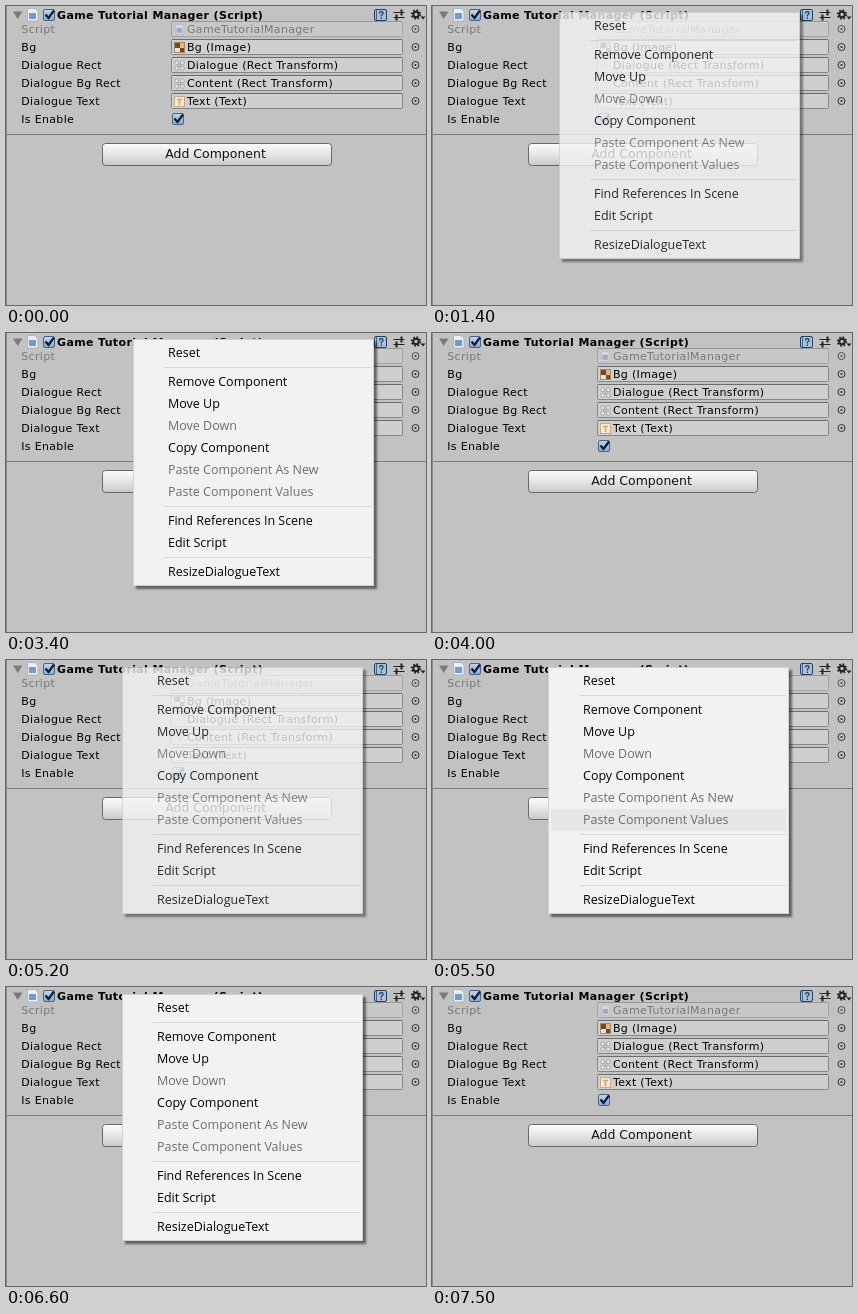
These frames come from a looping animation (420x299 px, 7.7 s). An HTML page:

```html
<!DOCTYPE html>
<html lang="en">
<head>
<meta charset="utf-8">
<title>Component context menu</title>
<style>
  html, body { margin: 0; width: 100%; height: 100%; overflow: hidden; background: #c2c2c2; }
  #stage { position: relative; width: 420px; height: 299px; overflow: hidden; }
  svg { display: block; }
  text { font: 11px "DejaVu Sans", sans-serif; letter-spacing: .32px; fill: #000; }
  .title { font-weight: bold; letter-spacing: .36px; }
  .button { font-size: 12.5px; letter-spacing: 0; text-anchor: middle; fill: #111; }
  .dim { fill: #787878; }

  .menu {
    position: absolute; left: 127px; top: 6px; width: 241px; height: 247px;
    box-sizing: border-box; padding: 2px;
    background: #f2f2f2; border: 1px solid #d0d0d0;
    box-shadow: 3px 3px 2px rgba(0, 0, 0, .5);
    font: 12.5px/22px "Open Sans", "Noto Sans", sans-serif; color: #000;
    white-space: nowrap; opacity: 0;
    animation: menu 7.7s step-end infinite;
  }
  .menu p { position: relative; margin: 0; height: 22px; padding-left: 32px; }
  .menu .off { color: #6d6d6d; }
  .menu hr { position: relative; margin: 3px 0 3px 28px; border: 0; height: 1px; background: #d7d7d7; }
  .hover {
    position: absolute; left: 2px; top: 0; width: 235px; height: 22px;
    background: #91c9f7; opacity: 0;
    animation: hover 7.7s step-end infinite;
  }

  @keyframes menu {
    0%     { opacity: 0; transform: none; }
    18.18% { opacity: .8; }
    19.48% { opacity: 1; }
    51.94% { opacity: 0; transform: translate(-11px, 1px); }
    67.53% { opacity: .8; }
    68.83% { opacity: 1; }
    97.4%, 100% { opacity: 0; transform: translate(-11px, 1px); }
  }
  @keyframes hover {
    0%     { opacity: 0; top: 97px; background: #91c9f7; }
    23.37% { opacity: 1; top: 97px; }
    24.67% { top: 170px; }
    25.97% { opacity: 1; top: 221px; }
    44.15% { opacity: 0; }
    70.12% { opacity: 1; top: 97px; background: #91c9f7; }
    71.42% { top: 141px; background: #e6e6e6; }
    72.72% { top: 170px; background: #91c9f7; }
    74.02% { top: 192px; }
    75.32% { opacity: 0; }
    76.62% { opacity: 1; top: 221px; }
    85.71%, 100% { opacity: 0; top: 221px; background: #91c9f7; }
  }
</style>
</head>
<body>
<div id="stage">
  <svg width="420" height="299" viewBox="0 0 420 299">
    <defs>
      <linearGradient id="face" x2="0" y2="1">
        <stop offset="0" stop-color="#fcfcfc"/>
        <stop offset=".5" stop-color="#e5e5e5"/>
        <stop offset="1" stop-color="#c8c8c8"/>
      </linearGradient>
      <linearGradient id="box" x2="0" y2="1">
        <stop offset="0" stop-color="#c3d5ea"/>
        <stop offset="1" stop-color="#86a8d2"/>
      </linearGradient>
      <g id="field">
        <rect x="165.5" y=".5" width="231" height="15" rx="1" fill="#cfcfcf" stroke="#868686"/>
        <path d="M166 .5h230" stroke="#6c6c6c"/>
      </g>
      <g id="pick">
        <circle cx="409.5" cy="8" r="3.5" fill="none" stroke="#303030"/>
        <circle cx="409.5" cy="8" r="1" fill="#202020"/>
      </g>
      <g id="row"><use href="#field"/><use href="#pick"/></g>
      <g id="check">
        <rect x=".5" y=".5" width="11" height="11" rx="1.5" fill="url(#box)" stroke="#4c6488"/>
        <path d="M2.5 5.5l3 3.5L11 1.5" fill="none" stroke="#0c1d33" stroke-width="2.2"/>
      </g>
      <g id="anchors" fill="#e4e4e4" stroke="#a0a0a0" stroke-width=".9">
        <circle cx="2.7" cy="2.7" r="2"/><circle cx="8.3" cy="2.7" r="2"/>
        <circle cx="2.7" cy="8.3" r="2"/><circle cx="8.3" cy="8.3" r="2"/>
        <path d="M4 4l3 3M7 4L4 7"/>
      </g>
      <g id="page">
        <path d="M.5.5h7.500l3 3v9.500h-10.500z" fill="#eaeff5" stroke="#a9b6c6"/>
        <rect x="2" y="5" width="7" height="6" fill="#6f9bd0"/>
      </g>
    </defs>

    <rect width="420" height="299" fill="#c2c2c2"/>
    <path d="M.5 0v299" stroke="#8a8a8a"/>
    <path d="M1 128.5h419" stroke="#7c7c7c"/>

    <path d="M7 5.5h9.5L11.7 13z" fill="#7a7a7a"/>
    <use href="#page" x="21" y="2"/>
    <use href="#check" x="37" y="3"/>
    <text class="title" x="51" y="13">Game Tutorial Manager (Script)</text>

    <!-- header tools -->
    <rect x="368.500" y="3.500" width="12" height="11" rx="1.5" fill="#a9bfda" stroke="#23405f"/>
    <path d="M370.500 4v10" stroke="#3f648f"/>
    <path d="M373.500 7.400q0-1.700 1.800-1.700t1.800 1.600q0 1-1.800 2v1.200M375.300 11.500v1.500" fill="none" stroke="#1d3652" stroke-width="1.2"/>
    <g fill="none" stroke="#222">
      <path d="M387.500 6.500h11M387.500 11.500h11"/>
      <path d="M395.500 3.500v6M390.500 8.500v6" stroke-width="2"/>
      <circle cx="410" cy="8.500" r="2.700" stroke-width="2"/>
      <circle cx="410" cy="8.500" r="4.300" stroke-width="1.800" stroke-dasharray="1.650 1.727"/>
    </g>
    <path d="M414.500 10.500h5l-2.500 3z" fill="#222"/>

    <!-- properties -->
    <g opacity=".5">
      <use href="#field" y="15"/>
      <use href="#page" transform="translate(169 18) scale(.8)"/>
    </g>
    <use href="#pick" y="15" opacity=".8"/>
    <use href="#row" y="33"/>
    <use href="#row" y="51"/>
    <use href="#row" y="69"/>
    <use href="#row" y="87"/>

    <text class="dim" x="15.300" y="27">Script</text>
    <text class="dim" x="181" y="27">GameTutorialManager</text>
    <text x="15.300" y="45">Bg</text>
    <text x="181" y="45">Bg (Image)</text>
    <text x="15.300" y="63">Dialogue Rect</text>
    <text x="181" y="63">Dialogue (Rect Transform)</text>
    <text x="15.300" y="81">Dialogue Bg Rect</text>
    <text x="181" y="81">Content (Rect Transform)</text>
    <text x="15.300" y="99">Dialogue Text</text>
    <text x="181" y="99">Text (Text)</text>
    <text x="15.300" y="117">Is Enable</text>

    <rect x="168.500" y="36.500" width="10" height="10" fill="#f0e2cc" stroke="#a5896a"/>
    <path d="M169 37h5v5h-5zM174 42h4v4h-4z" fill="#704a28"/>
    <path d="M174 37h4v5h-4z" fill="#eab87c"/>
    <use href="#anchors" x="168" y="54"/>
    <use href="#anchors" x="168" y="72"/>
    <rect x="168.500" y="90.500" width="10" height="10" fill="#f3e8da" stroke="#c4ab8c"/>
    <path d="M171 93.500h5M173.500 93.500v5.500" stroke="#e9a050" stroke-width="1.600"/>
    <use href="#check" x="166" y="107"/>

    <rect x="96.500" y="137.500" width="229" height="22" rx="3" fill="url(#face)" stroke="#686868"/>
    <text class="button" x="209.500" y="152">Add Component</text>
  </svg>

  <div class="menu">
    <div class="hover"></div>
    <p>Reset</p>
    <hr>
    <p>Remove Component</p>
    <p>Move Up</p>
    <p class="off">Move Down</p>
    <p>Copy Component</p>
    <p class="off">Paste Component As New</p>
    <p class="off">Paste Component Values</p>
    <hr>
    <p>Find References In Scene</p>
    <p>Edit Script</p>
    <hr>
    <p>ResizeDialogueText</p>
  </div>
</div>
</body>
</html>
```
